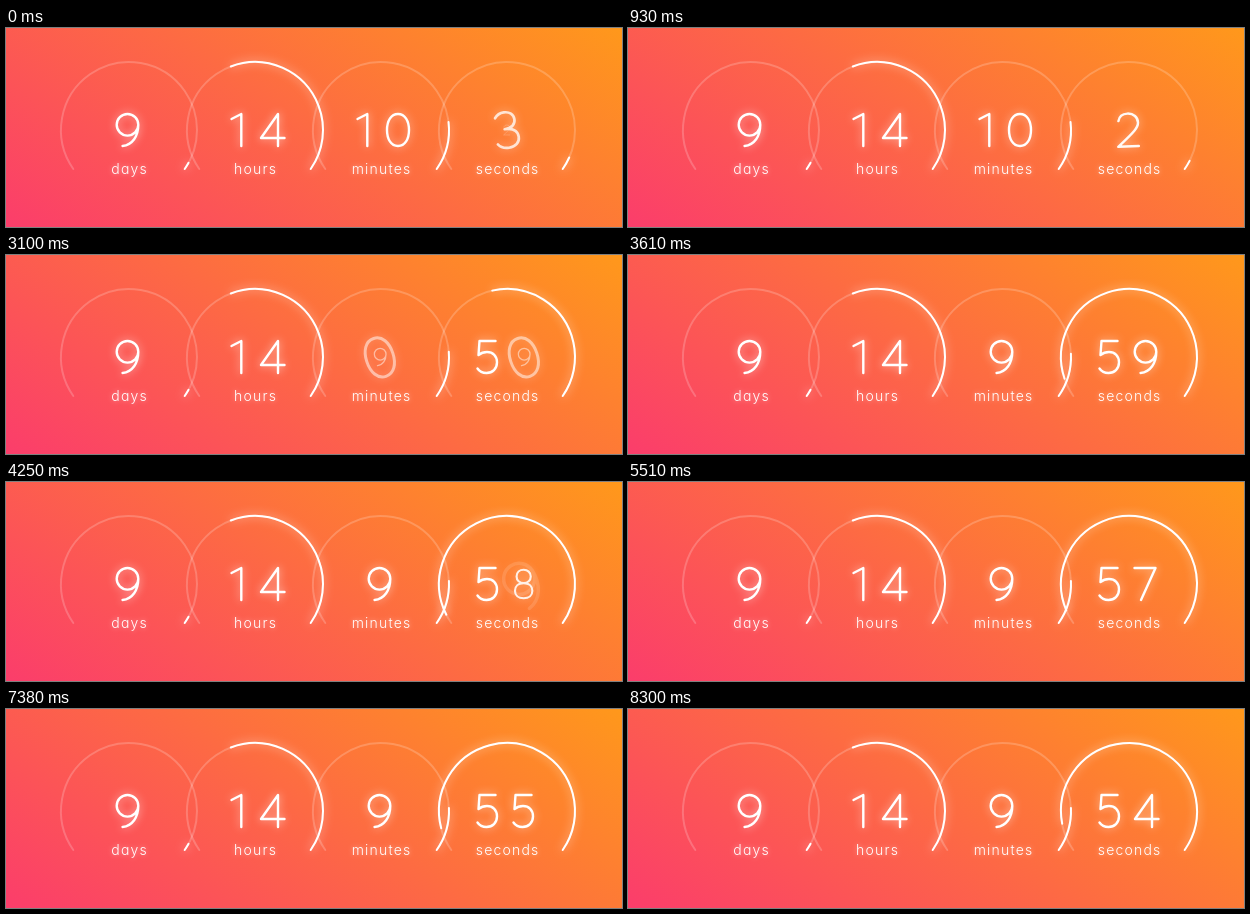
Write an HTML page with a canvas that moves like this. It is 616 px wide and 199 px high and loops after 8320 ms.

```html
<!DOCTYPE html>
<html lang="en">
<head>
<meta charset="utf-8">
<title>Countdown</title>
<style>
  html, body { margin: 0; width: 100%; height: 100%; overflow: hidden; }
  body {
    position: relative;
    background: linear-gradient(33deg, #fb3d6b, #ff981b);
  }
  canvas { position: absolute; left: 0; top: 0; }
  .label {
    position: absolute;
    top: 131px;
    width: 100px;
    margin-left: -50px;
    padding-left: 1.2px;
    box-sizing: border-box;
    text-align: center;
    color: #fff;
    font: 300 14px/20px Inter, Lato, sans-serif;
    font-feature-settings: "cv11";
    letter-spacing: 1.2px;
    text-shadow: 0 0 5px rgba(255, 255, 255, .5);
  }
</style>
</head>
<body>
<canvas id="stage" width="616" height="199"></canvas>
<div class="label" style="left:123px">days</div>
<div class="label" style="left:249px">hours</div>
<div class="label" style="left:375px">minutes</div>
<div class="label" style="left:501px">seconds</div>
<script>
const ctx = document.getElementById('stage').getContext('2d');

const LOOP = 8320;
const FIRST_TICK = -90;   // moment the count drops from 3 to 2
const TICK = 1000;
const SWAP = 390;         // length of a digit change
const EASE = 233;         // time constant of the rings
const CY = 102;
const RADIUS = 68;
const SPAN = 250;         // degrees in a full ring
const RING_END = 35;
const CELL = 36;

// Single-line digits, centred on their cell
const GLYPHS = [
  'M-1 -16C6 -16 10 -9 10 0C10 9 6 16 -1 16C-8 16 -12 9 -12 0C-12 -9 -8 -16 -1 -16Z',
  'M-5.5 -11L4.3 -16V16',
  'M-10 -9C-9 -14 -5 -16 -1 -16C5 -16 9 -12 9 -7C9 -2 5 2 -11 16H9',
  'M-9 -12C-7 -14.5 -4 -16 -.5 -16C4.5 -16 8 -13 8 -8.5C8 -4 4.5 -1 -2 -1C5 -1 9.5 2 9.5 7.5C9.5 12.5 5.5 16 -.5 16C-5 16 -8 14.5 -10 11.5',
  'M11.5 8H-12L5 -16V16',
  'M6.5 -16H-9.5L-10.5 -2C-8 -4 -5 -5 -2 -5C4 -5 8 -1 8 5.3C8 12 3.5 16 -2.5 16C-6.5 16 -9.5 14.5 -11.5 11.5',
  'M4 -16C-6 -15 -11.8 -6 -11.8 5.2A10.8 10.8 0 1 0 9.8 5.2A10.8 10.8 0 1 0 -11.8 5.2',
  'M-12.5 -16H8.5L-6 16',
  'M-1.5 -1C-6 -1 -9.5 -4 -9.5 -8.5C-9.5 -13 -6 -16 -1.5 -16C3 -16 6.5 -13 6.5 -8.5C6.5 -4 3 -1 -1.5 -1C-7.5 -1 -11.3 2.5 -11.3 7.5C-11.3 12.5 -7.5 16 -1.5 16C4.5 16 8.3 12.5 8.3 7.5C8.3 2.5 4.5 -1 -1.5 -1Z',
  'M-6.5 16C3.5 15 9.3 6 9.3 -5.2A10.8 10.8 0 1 0 -12.3 -5.2A10.8 10.8 0 1 0 9.3 -5.2'
].map(d => new Path2D(d));

const rad = deg => deg * Math.PI / 180;
const secondsAt = i => (62 - i) % 60;
const minutesAt = i => i < 3 ? 10 : 9;

// Eased ring value: each tick sets a new goal that is approached exponentially
function eased(valueAt, t) {
  let v = valueAt(-1);
  for (let i = 0; FIRST_TICK + i * TICK <= t; i++) {
    const dt = Math.min(TICK, t - FIRST_TICK - i * TICK);
    v += (valueAt(i) - v) * (1 - Math.exp(-dt / EASE));
  }
  return v;
}

function glow(blur, alpha) {
  ctx.shadowBlur = blur;
  ctx.shadowColor = `rgba(255,255,255,${alpha})`;
}

function arc(x, sweep, color) {
  ctx.strokeStyle = color;
  ctx.beginPath();
  ctx.arc(x, CY, RADIUS, rad(RING_END - sweep), rad(RING_END));
  ctx.stroke();
}

function ring(x, part) {
  ctx.lineWidth = 2;
  ctx.lineCap = 'round';
  glow(0, 0);
  arc(x, SPAN, 'rgba(255,255,255,.2)');
  if (part < 0.0005) return;
  glow(10, .7);
  arc(x, SPAN * part, '#fff');
}

function digit(n, x, alpha = 1, scale = 1, turn = 0) {
  if (alpha <= 0) return;
  ctx.save();
  ctx.translate(x, CY);
  ctx.rotate(rad(turn));
  ctx.scale(scale, scale);
  ctx.globalAlpha = alpha;
  ctx.lineWidth = 2.4;
  ctx.lineCap = ctx.lineJoin = 'round';
  ctx.strokeStyle = '#fff';
  glow(8, .6);
  ctx.stroke(GLYPHS[n]);
  ctx.restore();
}

// Only the last digit is animated; the leading one switches at once
function number(x, now, before, p) {
  const lastX = now > 9 ? x + CELL / 2 : x;
  if (now > 9) digit(Math.floor(now / 10), x - CELL / 2);
  if (now === before || p >= 1) return digit(now % 10, lastX);
  digit(before % 10, lastX, 1 - p, 1 + p / 2, -37 * p);
  digit(now % 10, lastX, p, .1 + .9 * p);
}

function draw(t) {
  const i = Math.floor((t - FIRST_TICK) / TICK);
  const p = Math.min(1, (t - FIRST_TICK - i * TICK) / SWAP);

  ctx.clearRect(0, 0, 616, 199);
  ring(123, 9 / 365);
  ring(249, 14 / 24);
  ring(375, eased(minutesAt, t) / 60);
  ring(501, eased(secondsAt, t) / 60);

  number(123, 9, 9, 1);
  number(249, 14, 14, 1);
  number(375, minutesAt(i), minutesAt(i - 1), p);
  number(501, secondsAt(i), secondsAt(i - 1), p);
}

const start = performance.now();
function frame() {
  draw((performance.now() - start) % LOOP);
  requestAnimationFrame(frame);
}
frame();
</script>
</body>
</html>
```
